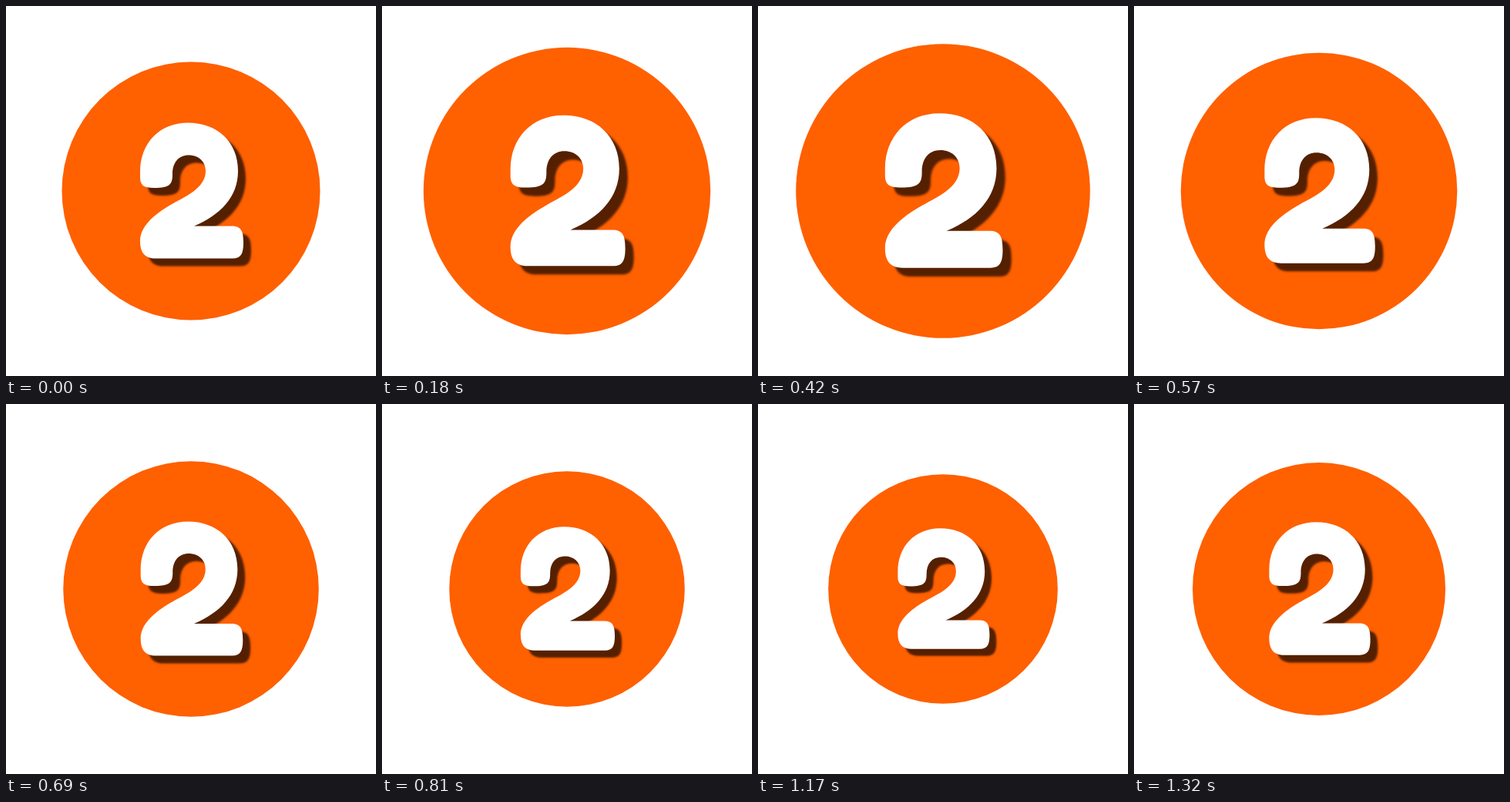
An HTML page with a canvas for the animation above (1.35 s loop, 480 px wide and 480 px high).

```html
<!DOCTYPE html>
<html lang="en">
<head>
<meta charset="utf-8">
<title>Pulsing number</title>
<style>
  html, body { margin: 0; width: 480px; height: 480px; overflow: hidden; background: #fff; }
  canvas { display: block; }
</style>
</head>
<body>
<canvas id="stage" width="480" height="480"></canvas>
<script>
const ctx = document.getElementById('stage').getContext('2d');
const LOOP = 1350, STEP = 30, RADIUS = 167.5, SWING = 0.15;

// Numeral outline, centred on the badge at scale 1
const two = new Path2D(`
  M-66 -25 C-66 -62 -41 -88.5 -4 -88.5
  C34 -88.5 61 -64 61 -26
  C61 8 38 31 4 45.5
  L53 45.5 C65 45.5 68 52 68 67
  C68 81 65 87.5 54 87.5
  L-46 87.5 C-59 87.5 -66 81 -66 65
  C-66 47 -50 31 -23 16
  C-7 7 19 -4 19 -26
  C19 -38 10 -46.5 -3 -46.5
  C-16 -46.5 -24 -37 -24 -22
  C-24 -9 -27 -4 -48 -4
  C-61 -4 -66 -7 -66 -18 Z`);

function draw(time) {
  const scale = 1 + SWING * Math.sin(2 * Math.PI * time / LOOP);
  ctx.setTransform(1, 0, 0, 1, 0, 0);
  ctx.fillStyle = '#fff';
  ctx.fillRect(0, 0, 480, 480);

  ctx.setTransform(scale, 0, 0, scale, 240, 240);
  ctx.fillStyle = '#ff6000';
  ctx.beginPath();
  ctx.arc(0, 0, RADIUS, 0, 2 * Math.PI);
  ctx.fill();

  // Canvas shadows ignore the transform, so scale them here
  ctx.save();
  ctx.shadowColor = '#552000';
  ctx.shadowOffsetX = ctx.shadowOffsetY = 10 * scale;
  ctx.shadowBlur = 2.5 * scale;
  ctx.fillStyle = '#fff';
  ctx.fill(two);
  ctx.restore();
}

const start = performance.now();
function tick() {
  const time = (performance.now() - start) % LOOP;
  draw(Math.floor(time / STEP) * STEP);
  requestAnimationFrame(tick);
}
tick();
</script>
</body>
</html>
```
